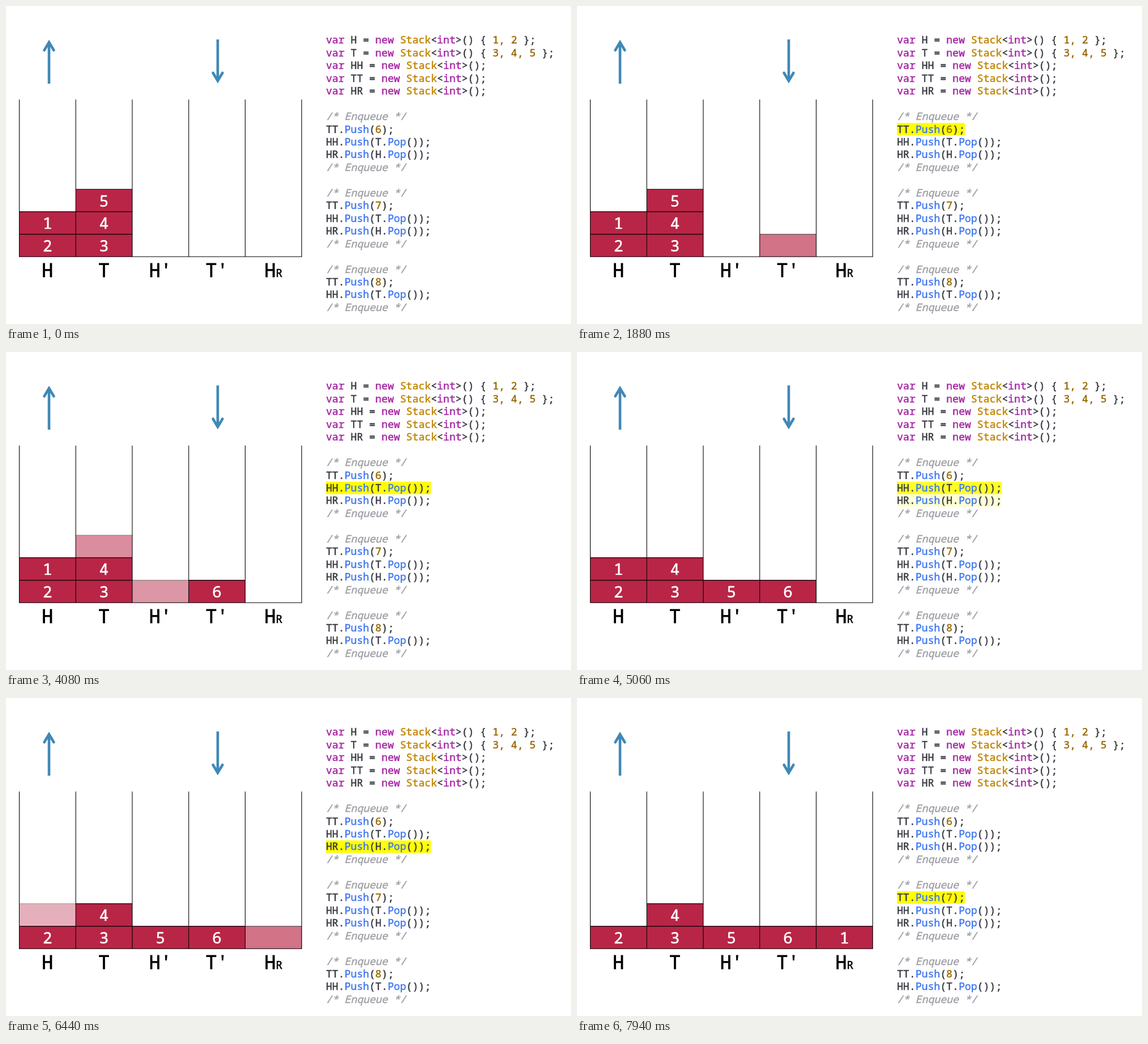
An HTML page for the animation above (8 s loop, 998 px wide and 561 px high).

```html
<!DOCTYPE html>
<html lang="en">
<head>
<meta charset="utf-8">
<title>Queue built from stacks</title>
<style>
  html, body { margin: 0; width: 100%; height: 100%; overflow: hidden; background: #fff; }
  svg { display: block; width: 100%; height: 100%; }
  text { font-family: "Noto Sans Mono", "DejaVu Sans Mono", monospace; white-space: pre; }
  text, tspan { fill: currentColor; stroke: currentColor; }
  .code { font-size: 18.17px; stroke-width: 0.5; color: #383a42; }
  .keyword { color: #a626a4; }
  .type { color: #c18401; }
  .method { color: #4078f2; }
  .number { color: #986801; }
  .comment { color: #a0a1a7; font-style: italic; }
  .digit { font-size: 27.6px; stroke-width: 0.6; color: #fff; text-anchor: middle; }
  .label { font-size: 33.4px; stroke-width: 0.8; color: #000; text-anchor: middle; }
  .sub { font-size: 19.6px; stroke-width: 0.5; }
  .line { fill: none; stroke: #000; stroke-width: 1.1; }
  .arrow { fill: none; stroke: #4088b6; stroke-width: 4.6; }
  .cell { fill: #b92546; }
  .mark { fill: #ff0; }
</style>
</head>
<body>
<svg id="stage" viewBox="0 0 998 561" preserveAspectRatio="none"></svg>
<script>
const LOOP = 8000, FADE = 500;
const LEFT = 23.5, FLOOR = 442.3, COL = 99.75, ROW = 39.7;
const CODE_X = 565.2, CODE_TOP = 49.2, LINE = 22.45, CHAR = 10.9;

const code = `var H = new Stack<int>() { 1, 2 };
var T = new Stack<int>() { 3, 4, 5 };
var HH = new Stack<int>();
var TT = new Stack<int>();
var HR = new Stack<int>();

/* Enqueue */
TT.Push(6);
HH.Push(T.Pop());
HR.Push(H.Pop());
/* Enqueue */

/* Enqueue */
TT.Push(7);
HH.Push(T.Pop());
HR.Push(H.Pop());
/* Enqueue */

/* Enqueue */
TT.Push(8);
HH.Push(T.Pop());
/* Enqueue */`.split("\n");

const marks = [
  { line: 7, from: 420, to: 2700 },
  { line: 8, from: 2700, to: 4980 },
  { line: 9, from: 4980, to: 7260 },
  { line: 13, from: 7260 }
];

// Upper cells come first so that each lower cell's top edge stays visible.
const cells = [
  { value: 1, col: 0, row: 1, to: 6120 },
  { value: 2, col: 0, row: 0 },
  { value: 5, col: 1, row: 2, to: 3840 },
  { value: 4, col: 1, row: 1 },
  { value: 3, col: 1, row: 0 },
  { value: 5, col: 2, row: 0, from: 3840 },
  { value: 6, col: 3, row: 0, from: 1560 },
  { value: 1, col: 4, row: 0, from: 6120 }
];

const stage = document.getElementById("stage");

function add(tag, attrs, content = "", parent = stage) {
  const node = document.createElementNS("http://www.w3.org/2000/svg", tag);
  for (const name in attrs) node.setAttribute(name, attrs[name]);
  node.textContent = content;
  return parent.appendChild(node);
}

// Shows a node between two times, with an optional fade at each end.
function show(node, { from, to }, fade = FADE) {
  if (from === undefined && to === undefined) return;
  const steps = [[0, from === undefined ? 1 : 0]];
  if (from !== undefined) steps.push([from, 0], [from + fade, 1]);
  if (to !== undefined) steps.push([to, 1], [to + fade, 0]);
  steps.push([LOOP, to === undefined ? 1 : 0]);
  node.animate(
    steps.map(([time, opacity]) => ({ offset: time / LOOP, opacity })),
    { duration: LOOP, iterations: Infinity }
  );
}

function drawCode(line, index) {
  const text = add("text", { class: "code", x: CODE_X, y: CODE_TOP + 17.2 + index * LINE });
  const token = /(?<comment>\/\*.*\*\/)|(?<keyword>\b(?:var|new|int)\b)|(?<type>Stack)|(?<method>Push|Pop)|(?<number>\d,?)/g;
  let end = 0;
  for (const match of line.matchAll(token)) {
    text.append(line.slice(end, match.index));
    const kind = Object.keys(match.groups).find(name => match.groups[name]);
    add("tspan", { class: kind }, match[0], text);
    end = match.index + match[0].length;
  }
  text.append(line.slice(end));
}

function drawCell(cell) {
  const x = LEFT + cell.col * COL, y = FLOOR - (cell.row + 1) * ROW;
  const box = add("g", {});
  add("rect", { class: "cell", x, y, width: COL, height: ROW }, "", box);
  add("path", { class: "line", d: `M${x} ${y}h${COL}` }, "", box);
  show(box, cell);
  const digit = add("text", { class: "digit", x: x + COL / 2, y: y + 30.3 }, cell.value);
  // Digits switch hard: on once the cell is solid, off as it starts to fade.
  const from = cell.from === undefined ? undefined : cell.from + FADE;
  show(digit, { from, to: cell.to }, 0);
}

function drawArrow(x, tail, tip) {
  const back = tip + Math.sign(tail - tip) * 14;
  add("path", { class: "arrow", d: `M${x} ${tail}V${tip}` });
  add("path", {
    class: "arrow", "stroke-linecap": "round",
    d: `M${x - 8.4} ${back}L${x} ${tip}L${x + 8.4} ${back}`
  });
}

for (const mark of marks) {
  show(add("rect", {
    class: "mark", x: CODE_X, y: CODE_TOP + mark.line * LINE,
    width: code[mark.line].length * CHAR, height: LINE - 0.4
  }), mark);
}
code.forEach(drawCode);

drawArrow(76, 137, 64);
drawArrow(374, 59, 132);

cells.forEach(drawCell);
for (let i = 0; i <= 5; i++) add("path", { class: "line", d: `M${LEFT + i * COL} 165V${FLOOR}` });
add("path", { class: "line", d: `M${LEFT - 0.5} ${FLOOR}H${LEFT + 5 * COL + 0.5}` });

["H", "T", "H'", "T'", "H"].forEach((name, i) => {
  const label = add("text", { class: "label", x: LEFT + (i + 0.5) * COL, y: 478 }, name);
  if (i === 4) add("tspan", { class: "sub" }, "R", label);
});
</script>
</body>
</html>
```
